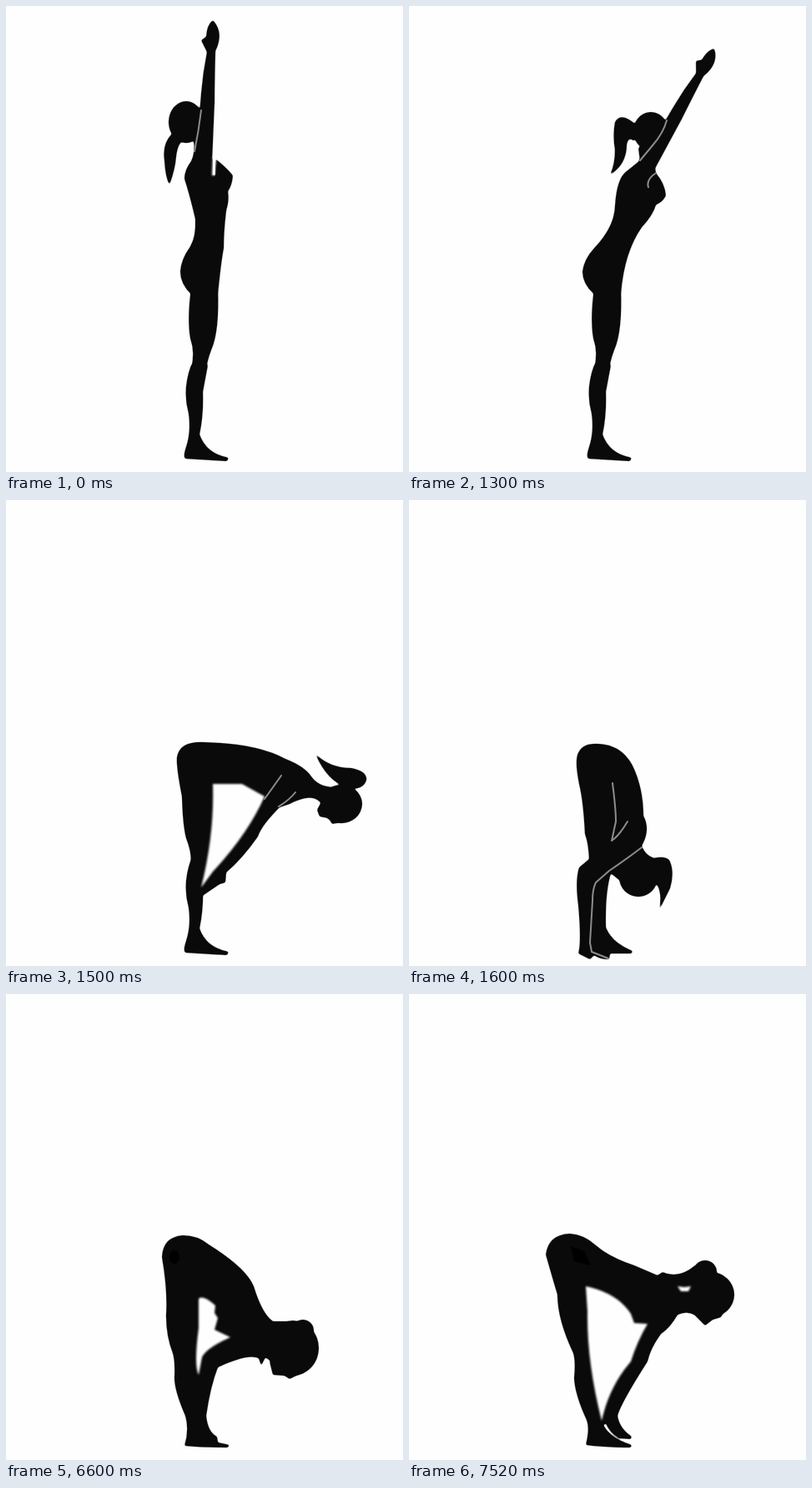
Write an HTML page without scripts that moves like this. It is 476 px wide and 558 px high and loops after 8 s.

```html
<!DOCTYPE html>
<html lang="en">
<head>
<meta charset="utf-8">
<title>Forward fold</title>
<style>
html, body { margin: 0; width: 100%; height: 100%; overflow: hidden; background: #fefefe; }
svg { display: block; width: 476px; height: 558px; }
.body { fill: #0a0a0a; filter: url(#soft); }
.hole { fill: #fefefe; filter: blur(1px); }
.line { fill: none; stroke: #8c8c8c; stroke-width: 2; stroke-linecap: round; stroke-linejoin: round; filter: blur(.4px); }
.shade { fill: #000; }
.pose { visibility: hidden; animation: 8s step-end infinite; }
.reach { animation-name: reach; }
.lean { animation-name: lean; }
.hinge { animation-name: hinge; }
.bend { animation-name: bend; }
.fold { animation-name: fold; }
.rise { animation-name: rise; }
.half { animation-name: half; }
@keyframes reach { 0% { visibility: visible } 16.25%, 100% { visibility: hidden } }
@keyframes lean { 16.25% { visibility: visible } 17.5% { visibility: hidden } }
@keyframes hinge { 17.5% { visibility: visible } 18.75% { visibility: hidden } }
@keyframes bend { 18.75% { visibility: visible } 20% { visibility: hidden } }
@keyframes fold { 20% { visibility: visible } 82.5% { visibility: hidden } }
@keyframes rise { 82.5% { visibility: visible } 85% { visibility: hidden } }
@keyframes half { 85%, 100% { visibility: visible } }
</style>
</head>
<body>
<svg viewBox="0 0 476 558">
  <defs>
    <!-- rounds the corners and leaves a soft edge -->
    <filter id="soft" filterUnits="userSpaceOnUse" x="0" y="0" width="476" height="558" color-interpolation-filters="sRGB">
      <feGaussianBlur stdDeviation="1.3"/>
      <feComponentTransfer><feFuncA type="linear" slope="2.6" intercept="-.7"/></feComponentTransfer>
    </filter>
    <path id="shin" d="M222 430Q211 460 219 488Q222 510 216 528Q212 540 215 542L265 545 267 541Q240 536 232 513Q237 490 236 462L242 430Z"/>
    <g id="leg">
      <use href="#shin"/>
      <path d="M222 338Q217 375 221 398Q227 415 222 434L241 434Q240 428 246 412Q256 390 254 338Z"/>
    </g>
    <!-- fingertips at the origin -->
    <path id="arm" transform="translate(-248 -17)" d="M248 17Q262 32 251 54Q250 100 250 115L247 186 224 186Q231 150 234 105Q236 80 241 55L234 41 240 37Q241 22 248 17Z"/>
  </defs>

  <g class="pose reach">
    <g class="body">
      <use href="#leg"/>
      <use href="#arm" x="248" y="17"/>
      <ellipse cx="216" cy="139" rx="21" ry="25"/>
      <path d="M199 153Q187 165 190 185Q191 205 196 214Q203 195 204 180Q206 163 214 160Z"/>
      <path d="M222 345Q209 333 209 318Q210 303 221 288Q228 276 227 255Q220 225 214 207Q214 196 222 186Q227 176 225 160L236 160 248 184 248 203 251 203 251 183Q264 193 272 203Q271 215 266 222Q268 232 264 245Q261 270 261 290Q258 305 254 345Z"/>
    </g>
    <path class="line" d="M234 125Q231 150 226 174"/>
    <path class="hole" d="M248 180 252 183 250 203 247 203Z"/>
  </g>

  <g class="pose lean">
    <g class="body">
      <use href="#leg"/>
      <use href="#arm" transform="translate(366 51) rotate(26) scale(.95)"/>
      <ellipse cx="290" cy="150" rx="21" ry="23"/>
      <path d="M272 142Q254 126 247 139Q244 155 247 172Q247 190 241 202Q261 190 261 166Q263 155 270 162Z"/>
      <path d="M222 345Q208 333 208 318Q210 303 222 290Q246 265 247 240Q249 205 262 197L277 185 275 170 290 160 296 200Q307 213 308 227Q304 235 296 238Q293 250 279 265Q258 295 254 345Z"/>
    </g>
    <path class="line" d="M309 137Q305 152 292 167L277 185M296 200Q284 208 287 217"/>
  </g>

  <g class="pose hinge">
    <g class="body">
      <use href="#leg"/>
      <use href="#arm" transform="translate(423 392) rotate(143)"/>
      <ellipse cx="396" cy="221" rx="22" ry="21"/>
      <path d="M374 235 378 250 391 246 397 248 404 237Z"/>
      <path d="M396 202 395 184Q385 174 366 189Q352 201 328 202Q350 210 376 201Z"/>
      <path d="M222 345Q208 335 208 318Q209 304 222 292Q260 255 280 242Q322 219 340 222Q362 224 375 202L390 240Q360 236 354 247Q349 255 344 268L345 290 333 286Q318 278 290 290Q262 302 254 315L254 345Z"/>
    </g>
    <path class="line" d="M317 260Q324 273 336 285M342 250 346 265"/>
  </g>

  <g class="pose bend">
    <g class="body">
      <use href="#shin"/>
      <ellipse cx="402" cy="364" rx="25" ry="23"/>
      <path d="M380 358 373 371 376 379 387 381 391 388 405 385Z"/>
      <path d="M371 304Q388 321 414 321Q434 325 432 336Q428 348 410 345Q385 337 371 304Z"/>
      <path d="M221 440Q224 425 216 405Q212 390 211 355Q204 320 205 308Q208 289 235 290Q300 291 335 310Q358 319 366 331Q374 343 392 344L380 366Q370 348 340 364L328 368Q306 390 302 403Q283 430 264 446L263 458 256 460 234 475 222 470Z"/>
    </g>
    <path class="hole" d="M248 340 283 340 310 355Q290 400 248 445L234 464Q250 400 248 340Z"/>
    <path class="line" d="M330 330 310 358M347 350Q340 359 327 367"/>
  </g>

  <g class="pose fold">
    <g class="body">
      <circle cx="275" cy="452" r="23"/>
      <path d="M290 430Q305 425 312 431Q319 445 313 465L300 491Q304 470 297 460Z"/>
      <path d="M204 440 216 430Q215 410 211 400Q209 360 204 340Q199 315 202 305Q207 291 225 292Q254 292 268 318Q281 345 281 378Q290 395 279 414Q284 428 299 430L280 450 252 455 242 447Q235 470 236 512Q243 530 268 540L267 543 241 543 240 550Q228 550 222 545L217 550 203 543Q207 530 203 485Q199 455 204 440Z"/>
    </g>
    <path class="line" d="M279 416Q262 429 240 444L224 458Q220 466 220 480L217 530 219 541 239 549M244 339Q248 370 248 385L243 408Q252 402 262 385"/>
  </g>

  <g class="pose rise">
    <g class="body">
      <ellipse cx="344" cy="424" rx="31" ry="33"/>
      <circle cx="356" cy="403" r="13"/>
      <path d="M316 440 320 456 334 457 340 461 350 456Z"/>
      <path d="M187 315Q188 291 212 289Q230 289 243 300Q288 328 297 350Q307 383 320 392L345 392 318 440 311 435 306 445 303 436Q290 430 254 447Q245 470 240 505Q242 525 253 530L254 537 268 540 266 543Q235 543 214 541Q220 522 215 505Q202 475 202 460Q203 440 200 430Q192 410 192 385Q194 355 187 315Z"/>
    </g>
    <path class="hole" d="M231 365Q236 360 251 373L250 382 254 388 250 402 269 411Q240 424 235 435L231 456Q225 445 231 400Z"/>
    <ellipse class="shade" cx="202" cy="315" rx="6" ry="8"/>
  </g>

  <g class="pose half">
    <g class="body">
      <ellipse cx="362" cy="360" rx="28" ry="27"/>
      <circle cx="355" cy="333" r="14"/>
      <path d="M338 380 355 397 364 390 374 387 380 376Z"/>
      <path d="M164 312Q167 288 193 287Q210 288 224 301Q240 315 270 325L298 337 304 333Q323 342 343 325L360 370 342 384Q333 379 322 384Q313 400 302 407Q289 425 286 440Q254 490 250 505Q252 520 267 530L266 533 252 532Q240 525 236 514L233 516Q241 532 267 540L266 543Q235 543 212 540Q217 520 213 510Q199 480 198 460Q200 440 197 430Q178 390 178 360Q172 340 164 312Z"/>
    </g>
    <path class="hole" d="M212 350Q250 358 266 383L270 394 286 395Q274 415 266 440Q240 470 231 511Q213 440 214 380Z"/>
    <path class="hole" d="M322 350 330 351 338 350 335 356 326 356Z"/>
    <path class="shade" d="M194 302 210 308 218 325 198 320Z"/>
  </g>
</svg>
</body>
</html>
```
